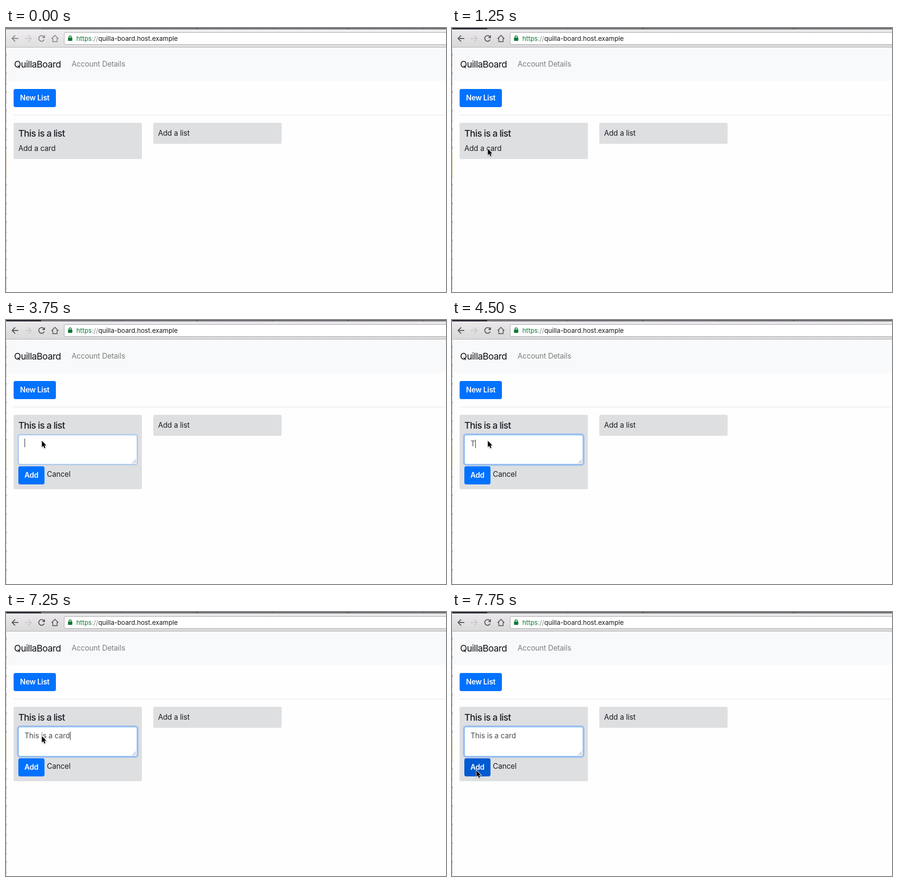
Animation, 926 px wide and 554 px high, one loop 8000 ms. Source, as an HTML page:

```html
<!DOCTYPE html>
<html lang="en">
<head>
<meta charset="utf-8">
<title>Board demo</title>
<style>
  html, body { margin: 0; width: 100%; height: 100%; overflow: hidden; background: #fff; }
  #stage {
    position: absolute; left: 0; top: 0; width: 926px; height: 554px; overflow: hidden;
    background: #fefefe; color: #1c1c24;
    font: 15.4px/24px Inter, "Open Sans", sans-serif; letter-spacing: -0.1px;
  }
  #stage div, #stage svg { position: absolute; box-sizing: border-box; white-space: pre; }

  /* browser frame */
  #bar { left: 0; top: 0; width: 926px; height: 41px; border-bottom: 1px solid #b4b2b4;
    background: linear-gradient(#ebe8eb 3px, #d9d9d9); color: #58565a; }
  .inactive #bar { background: linear-gradient(#f0edf0 3px, #dfdfdf); color: #87858a; }
  #tabs { left: 0; top: 0; width: 926px; height: 3px;
    background: repeating-linear-gradient(90deg, #747177 0 157px, #555259 157px 158.5px) 86px 0; }
  #active-tab { left: 1px; top: 0; width: 73px; height: 3px; background: #2b2933; }
  .inactive #active-tab { background: #8b888e; }
  #icons { left: 0; top: 0; fill: none; stroke: currentColor; stroke-width: 1.9; }
  #url { left: 122px; top: 9px; width: 820px; height: 26px; padding-left: 25px;
    border: 1px solid #a9a7aa; border-radius: 3px; background: #fff; color: #17171c;
    font-size: 13.6px; letter-spacing: 0; }
  #url i { font-style: normal; color: #0b7a35; }
  #url s { text-decoration: none; color: #84868a; }
  #edge { left: 0; top: 41px; width: 1px; height: 513px;
    background:
      linear-gradient(#c8b98a, #c8b98a) 0 222px / 1px 46px no-repeat,
      repeating-linear-gradient(#d8d8d8 0 13px, #777 13px 17px, #c4c4c4 17px 36px, #909090 36px 39px); }

  /* page */
  #nav { left: 1px; top: 41px; width: 925px; height: 70px; background: #f8f9fa; }
  #brand { left: 16px; top: 23px; font-size: 19.2px; letter-spacing: -0.028em; color: #101014; }
  #account { left: 137px; top: 23px; color: #7c7d7d; }
  #rule { left: 16px; top: 182px; width: 909px; height: 1px; background: #e5e5e5; }
  #stage .btn { height: 38px; line-height: 38px; border-radius: 4px; background: #0072ff; color: #fff;
    text-align: center; font-weight: 600; letter-spacing: -0.015em; }
  .panel { top: 199px; width: 270px; height: 44px; border-radius: 3px; background: #dedfe1; }
  .panel > div { left: 10px; }
  #list { left: 16px; height: 76px; }
  #next { left: 310px; }
  #title { top: 10px; font-size: 19.2px; font-weight: 500; letter-spacing: -0.035em; }
  #open { top: 42px; }
  #field { top: 42px; width: 250px; height: 62px; padding: 6px 12px; border: 1px solid #ced4da;
    border-radius: 4px; background: #fff; color: #495057; }
  #caret { position: relative; }
  #caret::after { content: ""; position: absolute; left: 0; top: 1px; width: 1px; height: 18px; background: #222; }
  #grip { right: 0; bottom: 0; stroke: #777; }
  #add { top: 108px; width: 55px; }
  #list #cancel { left: 70px; top: 113px; }

  /* states */
  #field, #add, #cancel { display: none; }
  .editing #list { height: 156px; }
  .editing #open { display: none; }
  .editing #field, .editing #add, .editing #cancel { display: block; }
  .glow1 #field { border-color: #9cc5fb; box-shadow: 0 0 0 2px rgba(0, 115, 255, .15); }
  .glow2 #field { border-color: #80b6ff; box-shadow: 0 0 0 3px rgba(0, 115, 255, .27); }
  #stage.hover #add { background: #005ad2; }
  #cursor { left: 0; top: 0; filter: drop-shadow(0 1px 1px rgba(0, 0, 0, .25)); }
</style>
</head>
<body>
<div id="stage" class="inactive">
  <div id="bar">
    <div id="tabs"></div>
    <div id="active-tab"></div>
    <svg id="icons" width="122" height="40">
      <path d="M26 22H13.5M19.3 15.5L12.8 22L19.3 28.5"/>
      <path d="M40 22H52.5M46.7 15.5L53.2 22L46.7 28.5" stroke="#cbc9cb"/>
      <path d="M79.4 17.8A6 6 0 1 0 80.6 24"/>
      <path d="M82 14.8V21H75.8Z" fill="currentColor" stroke="none"/>
      <path d="M95.8 22.6L103 15.4L110.2 22.6M98.4 21V28.6H107.6V21" stroke-width="1.6"/>
    </svg>
    <div id="url"><i>https</i><s>://</s>quilla-board.host.example<svg width="10" height="13" style="left:7px;top:5px">
      <path d="M2.5 6V4a2.5 2.5 0 0 1 5 0V6" fill="none" stroke="#0b7a35" stroke-width="1.5"/>
      <rect x=".5" y="5" width="9" height="7" rx="1" fill="#0b7a35"/>
    </svg></div>
  </div>

  <div id="nav">
    <div id="brand">QuillaBoard</div>
    <div id="account">Account Details</div>
  </div>
  <div class="btn" style="left:16px;top:128px;width:89px">New List</div>
  <div id="rule"></div>

  <div id="list" class="panel">
    <div id="title">This is a list</div>
    <div id="open">Add a card</div>
    <div id="field"><span id="typed"></span><span id="caret"></span><svg id="grip" width="10" height="10"><path d="M1 8.5L8.5 1M5 8.5L8.5 5"/></svg></div>
    <div id="add" class="btn">Add</div>
    <div id="cancel">Cancel</div>
  </div>
  <div id="next" class="panel"><div style="top:10px">Add a list</div></div>
  <div id="edge"></div>

  <svg id="cursor" width="16" height="22">
    <path d="M1.5 1.5V14.8L4.5 12L6.6 17L8.9 16L6.8 11.2H10.9Z" fill="#000" stroke="#fff" stroke-width="1.8" paint-order="stroke"/>
  </svg>
</div>

<script>
  const LOOP = 8000;
  const CARD = "This is a card";
  const $ = id => document.getElementById(id);

  // Each step holds only what changes at that time.
  const steps = [
    [0, { look: "inactive", at: null, typed: 0, caret: false }],
    [250, { at: [410, 79] }],
    [500, { at: [294, 130] }],
    [750, { at: [74, 275] }],
    [1000, { at: [74, 252] }],
    [1250, { look: "" }],
    [1750, { look: "editing" }],
    [3750, { look: "editing glow1", caret: true }],
    [4000, { look: "editing glow2" }],
    [4250, { caret: false }],
    [4500, { caret: true, typed: 1 }],
    [4750, { typed: 3 }],
    [5000, { typed: 5 }],
    [5250, { typed: 7 }],
    [5500, { typed: 9 }],
    [5750, { typed: 10 }],
    [6000, { typed: 12 }],
    [6250, { typed: 13 }],
    [6750, { caret: false }],
    [7000, { caret: true, typed: 14 }],
    [7250, { at: [74, 259] }],
    [7500, { at: [21, 334], caret: false }],
    [7750, { at: [50, 331], look: "editing glow2 hover" }]
  ];

  function stateAt(time) {
    const past = steps.filter(([start]) => start <= time);
    return Object.assign({}, ...past.map(([, change]) => change));
  }

  function draw(time) {
    const { look, at, typed, caret } = stateAt(time);
    $("stage").className = look;
    $("typed").textContent = CARD.slice(0, typed);
    $("caret").style.visibility = caret ? "visible" : "hidden";
    $("cursor").style.visibility = at ? "visible" : "hidden";
    if (at) $("cursor").style.transform = `translate(${at[0]}px, ${at[1]}px)`;
  }

  const begin = performance.now();
  function tick() {
    draw((performance.now() - begin) % LOOP);
    requestAnimationFrame(tick);
  }
  tick();
</script>
</body>
</html>
```
